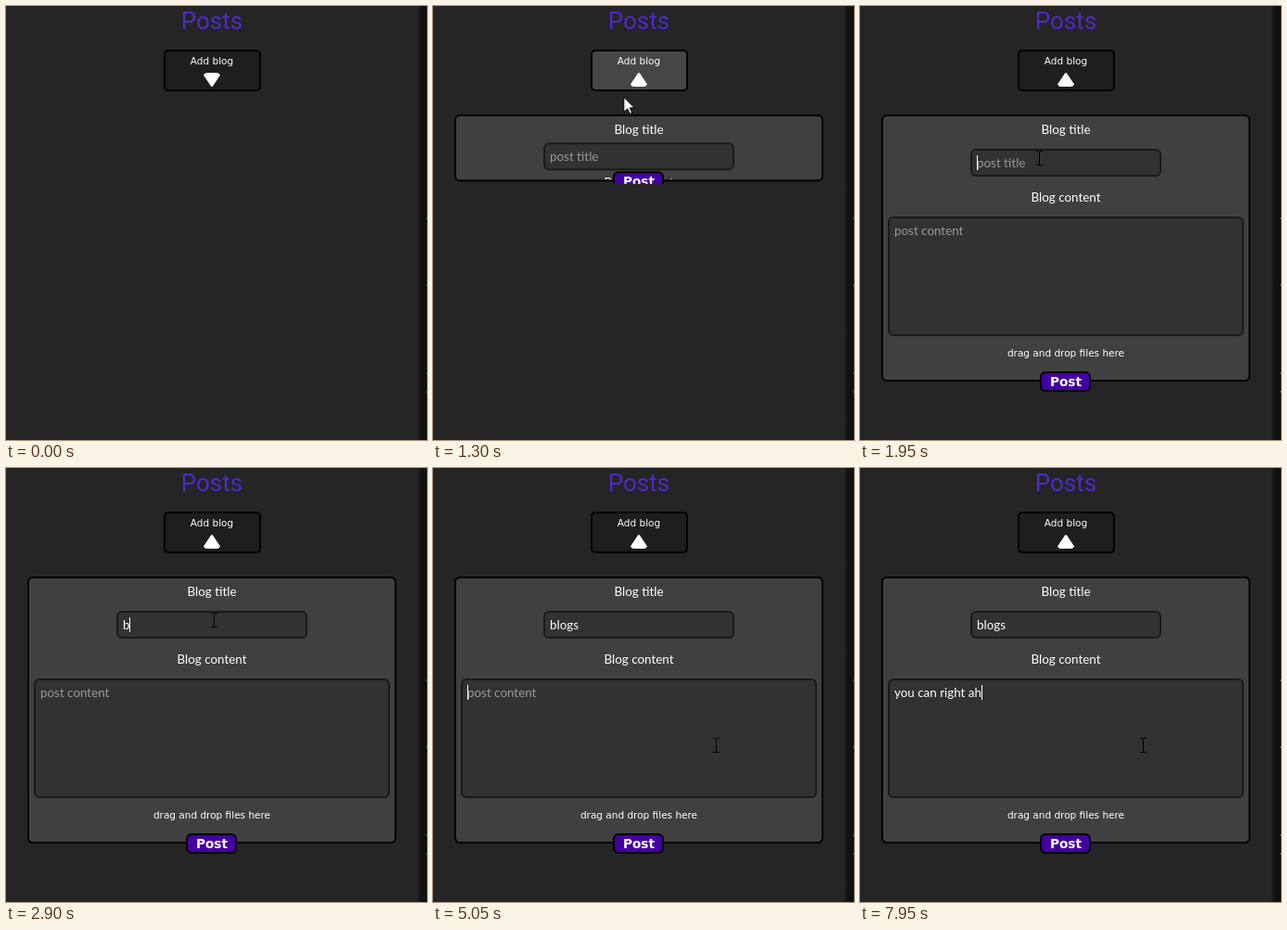
An HTML page with a canvas that plays this animation: 454x468 px, repeating every 8 s.

```html
<!DOCTYPE html>
<html lang="en">
<head>
<meta charset="utf-8">
<title>Add blog form</title>
<style>
html, body { margin: 0; width: 100%; height: 100%; overflow: hidden; background: #252525; }
canvas { display: block; }
</style>
</head>
<body>
<canvas id="stage" width="454" height="468"></canvas>
<script>
const ctx = document.getElementById('stage').getContext('2d');
const LOOP = 8000;
const OPEN_AT = 1200, OPEN_FOR = 560;
const TITLE_CLICK = 1900, BODY_CLICK = 4750;

const BODY_FONT = '13.4px Lato, sans-serif';
const WIDE_FONT = '10.5px "DejaVu Sans", sans-serif';

const title = { text: 'blogs', keys: [2900, 3050, 3200, 3350, 3450] };
const body = {
  text: 'you can right ah',
  keys: [5700, 5900, 6100, 6400, 6650, 6900]
};
while (body.keys.length < body.text.length) {
  body.keys.push(7200 + (body.keys.length - 6) * 80);
}

// Pointer stops: time, x, y
const route = [
  [350, 345, 490], [720, 206, 87], [1220, 206, 87], [1500, 205, 143],
  [1650, 205, 143], [1880, 193, 164], [2150, 193, 164], [2650, 224, 164],
  [4150, 224, 164], [4680, 305, 299]
];

const clamp = v => Math.max(0, Math.min(1, v));
const mix = (a, b, p) => a + (b - a) * p;
const smooth = p => p * p * (3 - 2 * p);

// cubic-bezier(.25, .1, .25, 1)
function ease(x) {
  if (x <= 0 || x >= 1) return clamp(x);
  let lo = 0, hi = 1, u = 0.5;
  for (let i = 0; i < 20; i++) {
    const v = 1 - u;
    if (0.75 * v * v * u + 0.75 * v * u * u + u * u * u < x) lo = u;
    else hi = u;
    u = (lo + hi) / 2;
  }
  const v = 1 - u;
  return 0.3 * v * v * u + 3 * v * u * u + u * u * u;
}

function pointerAt(t) {
  let [, x, y] = route[0];
  for (let i = 1; i < route.length; i++) {
    const [t0, x0, y0] = route[i - 1];
    const [t1, x1, y1] = route[i];
    if (t < t0) break;
    const p = smooth(clamp((t - t0) / (t1 - t0)));
    x = mix(x0, x1, p);
    y = mix(y0, y1, p);
  }
  return { x, y };
}

// Bordered box given by its outer edges
function box(x, y, w, h, r, fill, stroke) {
  ctx.beginPath();
  ctx.roundRect(x + 1, y + 1, w - 2, h - 2, r);
  ctx.fillStyle = fill;
  ctx.fill();
  ctx.lineWidth = 2;
  ctx.strokeStyle = stroke;
  ctx.stroke();
}

function label(str, x, y, font, color = '#fff', align = 'center') {
  ctx.font = font;
  ctx.fillStyle = color;
  ctx.textAlign = align;
  ctx.fillText(str, x, y);
}

function outline(points, x, y) {
  ctx.beginPath();
  points.forEach(([px, py]) => ctx.lineTo(x + px, y + py));
  ctx.closePath();
}

function field(t, data, hint, x, base, from, until) {
  const count = data.keys.filter(k => k <= t).length;
  const typed = data.text.slice(0, count);
  if (count) label(typed, x, base, BODY_FONT, '#fff', 'left');
  else label(hint, x, base, BODY_FONT, '#999', 'left');
  if (t < from || t >= until) return;
  const last = count ? data.keys[count - 1] : from;
  if ((t - last) % 1000 >= 500) return;
  ctx.font = BODY_FONT;
  const w = ctx.measureText(typed).width;
  ctx.fillStyle = '#fff';
  ctx.fillRect(Math.round(x + w), base - 13, 1, 16);
}

function drawBackdrop() {
  ctx.fillStyle = '#252525';
  ctx.fillRect(0, 0, 454, 468);
  const edge = ctx.createLinearGradient(443, 0, 450, 0);
  edge.addColorStop(0, '#252525');
  edge.addColorStop(0.5, '#151515');
  edge.addColorStop(1, '#101010');
  ctx.fillStyle = edge;
  ctx.fillRect(443, 0, 11, 468);
  ctx.fillStyle = '#555';
  for (const y of [228, 300, 395, 415]) ctx.fillRect(453, y, 1, 2);
  label('Posts', 222, 25, '26px Roboto, sans-serif', '#5029c8');
}

function drawToggle(t) {
  const hover = clamp((t - 640) / 120) * (1 - clamp((t - 1290) / 150));
  const c = Math.round(mix(30, 73, hover));
  box(170, 47, 105, 45, 4, `rgb(${c},${c},${c})`, '#000');
  label('Add blog', 222, 63, WIDE_FONT);
  ctx.save();
  ctx.translate(222, 79.5);
  if (t >= OPEN_AT) ctx.rotate(Math.PI);
  ctx.beginPath();
  ctx.moveTo(-9, -5);
  ctx.quadraticCurveTo(-8, -7.5, -5, -7.5);
  ctx.lineTo(5, -7.5);
  ctx.quadraticCurveTo(8, -7.5, 9, -5);
  ctx.lineTo(1, 7);
  ctx.quadraticCurveTo(0, 8, -1, 7);
  ctx.closePath();
  ctx.fillStyle = '#fff';
  ctx.fill();
  ctx.restore();
}

function drawPanel(t) {
  const p = ease((t - OPEN_AT) / OPEN_FOR);
  if (p <= 0) return;
  const bottom = mix(117, 405, p);
  const gap = Math.min(405 - bottom, 40) / 5;

  ctx.save();
  ctx.beginPath();
  ctx.rect(0, 117, 454, p < 1 ? 298 * p : 351);
  ctx.clip();
  box(23, 117, 398, Math.max(4, bottom - 117), 5, '#404040', '#000');

  ctx.save();
  ctx.beginPath();
  ctx.rect(25, 119, 394, Math.max(0, bottom - 121));
  ctx.clip();
  label('Blog title', 222, 138, BODY_FONT);
  box(119, 154 - gap * 0.85, 206, 30, 5, '#323232', '#1a1a1a');
  field(t, title, 'post title', 126, 174 - gap * 0.85, TITLE_CLICK, BODY_CLICK);
  label('Blog content', 222, 211 - gap * 2, BODY_FONT);
  box(30, 227 - gap * 3, 384, 129, 5, '#323232', '#1a1a1a');
  field(t, body, 'post content', 37, 247 - gap * 3, BODY_CLICK, LOOP);
  label('drag and drop files here', 222, 378 - gap * 4, WIDE_FONT);
  ctx.restore();

  box(194, bottom - 11, 55, 22, 5, '#4300a0', '#000');
  label('Post', 222, bottom + 5, 'bold 13.6px "DejaVu Sans", sans-serif');
  ctx.restore();
}

function drawArrow(x, y) {
  outline([[0, 0], [0, 16], [4, 12.5], [6.5, 18], [9, 17], [6.5, 11.5], [11.5, 11.5]], x, y);
  ctx.fillStyle = '#fff';
  ctx.fill();
  ctx.lineWidth = 1;
  ctx.strokeStyle = '#000';
  ctx.stroke();
}

function drawHand(x, y) {
  outline([
    [-2, 1], [0, -0.5], [2, 1], [2, 7], [4, 6.5], [5, 7.5], [7, 7.5], [8, 9],
    [9, 9], [10, 11], [9.5, 16], [7.5, 19], [7.5, 22], [-2, 22], [-2, 20],
    [-6.5, 13.5], [-6, 11.5], [-4, 11.5], [-2, 13.5]
  ], x, y);
  ctx.lineJoin = 'round';
  ctx.lineWidth = 2;
  ctx.strokeStyle = '#000';
  ctx.stroke();
  ctx.fillStyle = '#fff';
  ctx.fill();
}

function drawBeam(x, y) {
  x = Math.round(x);
  y = Math.round(y);
  ctx.fillStyle = '#000';
  ctx.fillRect(x, y - 7, 1, 15);
  for (const end of [y - 8, y + 7]) {
    ctx.fillRect(x - 3, end, 3, 1);
    ctx.fillRect(x + 1, end, 3, 1);
  }
}

function drawPointer(t) {
  const { x, y } = pointerAt(t);
  const onToggle = x > 170 && x < 275 && y > 47 && y < 92;
  if (onToggle) drawHand(x, y);
  else if (y > 120 && t > OPEN_AT) drawBeam(x, y);
  else drawArrow(x, y);
}

function frame(now) {
  const t = now % LOOP;
  drawBackdrop();
  drawToggle(t);
  drawPanel(t);
  drawPointer(t);
  requestAnimationFrame(frame);
}
frame(0);
</script>
</body>
</html>
```
